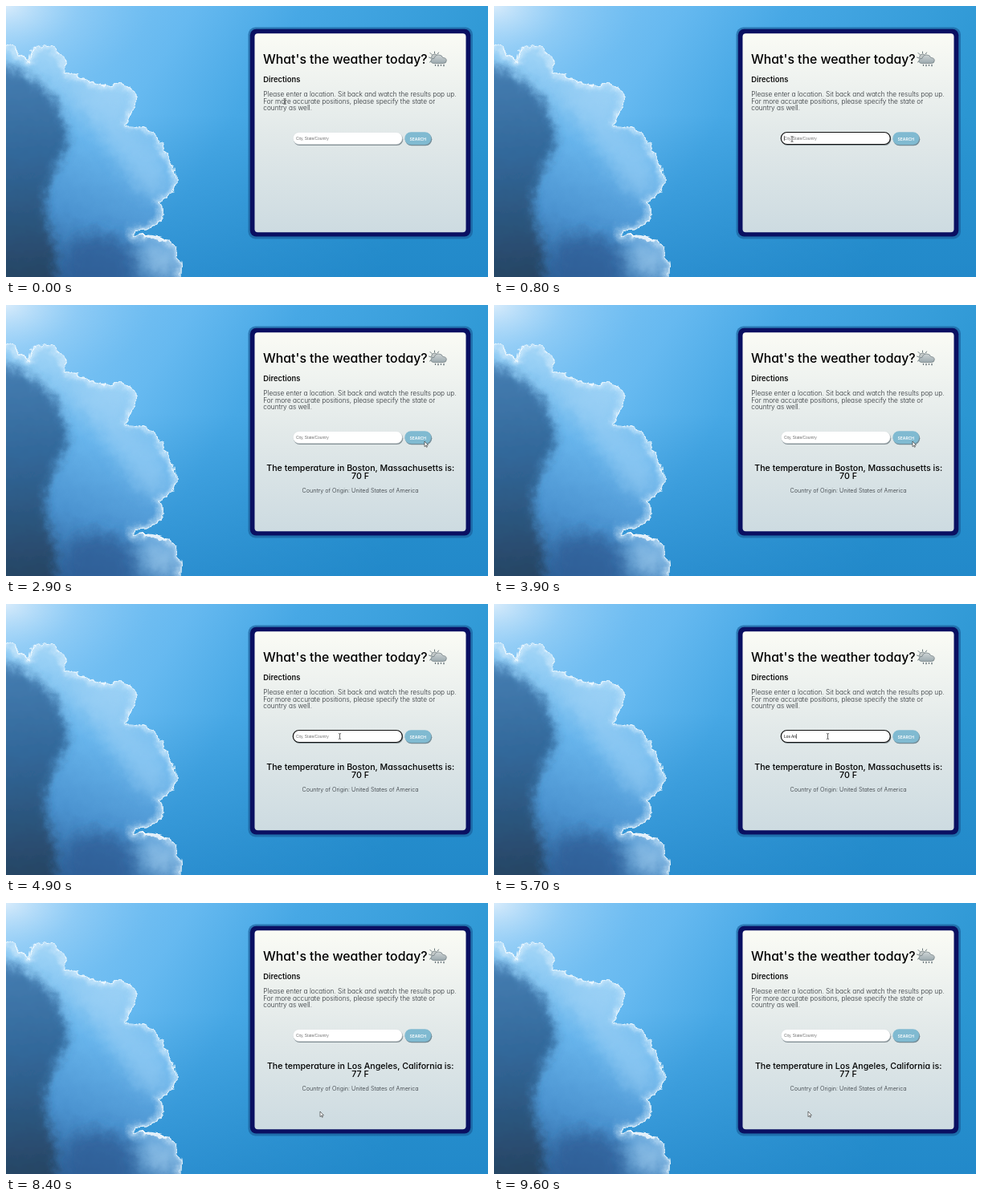
An HTML page for the animation above (9.7 s loop, 600 px wide and 338 px high).

```html
<!DOCTYPE html>
<html lang="en">
<head>
<meta charset="utf-8">
<title>Weather search</title>
<style>
  html, body { margin: 0; width: 100%; height: 100%; overflow: hidden; background: #3d9fde; }
  svg { position: absolute; left: 0; top: 0; width: 600px; height: 338px; }
  text { font-family: Inter, sans-serif; font-feature-settings: "cv11"; fill: #111; }
  .title { font-size: 15.8px; font-weight: 450; fill: #000; }
  .sub { font-size: 9.4px; font-weight: 560; }
  .body { font-size: 8.25px; font-weight: 300; fill: #2c3136; }
  .result { font-size: 10.65px; font-weight: 520; text-anchor: middle; fill: #000; }
  .origin { font-size: 7.2px; font-weight: 300; text-anchor: middle; fill: #2c3136; }
  .field { font-family: "Liberation Sans", Arial, sans-serif; font-size: 4.9px; }
  .button { font-size: 5px; font-weight: 600; text-anchor: middle; fill: #fff; }
</style>
</head>
<body>
<svg viewBox="0 0 600 338">
  <defs>
    <linearGradient id="sky" x1="0" y1="0" x2="1" y2=".35">
      <stop offset="0" stop-color="#8ccaf6"/>
      <stop offset=".35" stop-color="#66b9f0"/>
      <stop offset=".55" stop-color="#47a8e5"/>
      <stop offset="1" stop-color="#2b96d2"/>
    </linearGradient>
    <linearGradient id="low" x1="0" y1="0" x2="0" y2="1">
      <stop offset=".4" stop-color="#1c80c4" stop-opacity="0"/>
      <stop offset="1" stop-color="#1c80c4" stop-opacity=".6"/>
    </linearGradient>
    <radialGradient id="glow">
      <stop offset="0" stop-color="#e4f1fc" stop-opacity=".85"/>
      <stop offset=".5" stop-color="#b4dcf9" stop-opacity=".3"/>
      <stop offset="1" stop-color="#8ccaf6" stop-opacity="0"/>
    </radialGradient>
    <linearGradient id="mass" gradientUnits="userSpaceOnUse" x1="30" y1="338" x2="120" y2="90">
      <stop offset="0" stop-color="#2d5f96"/>
      <stop offset=".35" stop-color="#4b93d0"/>
      <stop offset=".7" stop-color="#68b5ec"/>
      <stop offset="1" stop-color="#9cd2f6"/>
    </linearGradient>
    <linearGradient id="shade" gradientUnits="userSpaceOnUse" x1="0" y1="70" x2="15" y2="338">
      <stop offset="0" stop-color="#477fb3"/>
      <stop offset=".45" stop-color="#316799"/>
      <stop offset="1" stop-color="#274564"/>
    </linearGradient>
    <filter id="rough" x="-10%" y="-10%" width="120%" height="120%" color-interpolation-filters="sRGB">
      <feTurbulence type="fractalNoise" baseFrequency=".085" numOctaves="3" seed="4"/>
      <feDisplacementMap in="SourceGraphic" scale="11" xChannelSelector="R" yChannelSelector="G"/>
    </filter>
    <filter id="soft3" x="-30%" y="-30%" width="160%" height="160%"><feGaussianBlur stdDeviation="3"/></filter>
    <filter id="soft6" x="-30%" y="-30%" width="160%" height="160%"><feGaussianBlur stdDeviation="6"/></filter>
    <filter id="soft10" x="-50%" y="-50%" width="200%" height="200%"><feGaussianBlur stdDeviation="10"/></filter>
    <path id="outline" d="M-20 50Q2 46 12 56T29 68Q29 55 42 50Q56 45 63 56Q74 64 76 84Q90 84 102 93Q118 100 130 97Q149 93 158 105Q165 119 157 132Q153 143 146 148Q161 146 176 153Q193 162 195 181Q209 189 211 206Q214 228 206 237L192 243Q198 254 192 268Q183 282 159 280L160 287Q184 280 202 292Q217 304 218 322L217 360H-20Z"/>
    <clipPath id="cloudClip"><use href="#outline"/></clipPath>
  </defs>
  <rect width="600" height="338" fill="url(#sky)"/>
  <rect width="600" height="338" fill="url(#low)"/>
  <ellipse rx="180" ry="110" fill="url(#glow)"/>
  <g filter="url(#rough)">
    <g clip-path="url(#cloudClip)">
      <use href="#outline" fill="url(#mass)"/>
      <g filter="url(#soft10)">
        <path d="M80 100L150 105L150 150L195 185L205 235L170 235L110 150Z" fill="#a6d6f7" opacity=".5"/>
        <path d="M75 300Q125 265 160 310V360H70Z" fill="#2b5d93" opacity=".75"/>
        <path d="M165 290L215 300V338H180Z" fill="#a3cff0" opacity=".7"/>
      </g>
      <path d="M-30 70Q18 74 38 96Q64 112 70 140Q83 165 73 182Q58 202 50 236Q46 262 58 292Q66 320 60 370H-30Z" fill="url(#shade)" filter="url(#soft6)"/>
      <use href="#outline" fill="none" stroke="#d6edfd" stroke-width="10" opacity=".7" filter="url(#soft3)"/>
      <use href="#outline" fill="none" stroke="#f6fcff" stroke-width="2.5" opacity=".75"/>
      <path d="M159 282L200 292" stroke="#fff" stroke-width="5" opacity=".7"/>
    </g>
  </g>
</svg>

<svg viewBox="0 0 600 338">
  <defs>
    <linearGradient id="card" x1="0" y1="0" x2="0" y2="1">
      <stop offset="0" stop-color="#fafbf5"/>
      <stop offset=".5" stop-color="#e2e9e9"/>
      <stop offset="1" stop-color="#cddbe1"/>
    </linearGradient>
    <linearGradient id="grey" x1="0" y1="0" x2="0" y2="1">
      <stop offset="0" stop-color="#cfd5d6"/>
      <stop offset="1" stop-color="#9ba9ae"/>
    </linearGradient>
    <filter id="blur"><feGaussianBlur stdDeviation=".6"/></filter>
  </defs>
  <rect x="301.5" y="26.5" width="279.500" height="264" rx="9" fill="#1a5c98" opacity=".65" filter="url(#blur)"/>
  <rect x="303.800" y="28.800" width="274.500" height="258.700" rx="7.500" fill="#0a1062"/>
  <rect x="309.500" y="34.300" width="263" height="248" rx="4" fill="url(#card)"/>

  <text class="title" x="320" y="72">What's the weather today?</text>
  <g stroke="#5d6a70" stroke-width=".6" stroke-linecap="round">
    <path d="M526.500 64L529 65M528 58.500L530 60.500M533.500 57V59M538.500 58L537.300 60M527.500 70L529.500 68.500" fill="none" stroke-width=".9"/>
    <circle cx="533.500" cy="64" r="4" fill="#c4cac9"/>
    <path d="M532 71.500Q528.500 71 529 68Q529.500 65 533 65.300Q534.500 60.500 539 61Q543 61.300 543.800 64.500Q548.300 64.500 548.300 68.200Q548 71.500 545 71.500Z" fill="url(#grey)"/>
    <path d="M534.500 73.300V74.300M538 73.300V74.800M541.500 73.300V74.300M545 73.300V74.800" fill="none" stroke-width="1.300"/>
  </g>
  <text class="sub" x="320.300" y="95.300">Directions</text>
  <text class="body">
    <tspan x="320.300" y="113.200">Please enter a location. Sit back and watch the results pop up.</tspan>
    <tspan x="320.300" y="121.500">For more accurate positions, please specify the state or</tspan>
    <tspan x="320.300" y="129.900">country as well.</tspan>
  </text>

  <rect x="357.800" y="158.700" width="136.500" height="15.300" rx="7.600" fill="#6f7c82" opacity=".8" filter="url(#blur)"/>
  <rect id="box" x="357.300" y="157.500" width="136" height="15" rx="7.500" fill="#fff"/>
  <text class="field" id="field" x="361" y="166.700"></text>
  <path id="caret" d="M0 162V168" stroke="#000" stroke-width=".6"/>

  <rect x="496.800" y="158.300" width="33.500" height="16" rx="8" fill="#567482" opacity=".8" filter="url(#blur)"/>
  <rect x="496.300" y="157.300" width="33" height="15.700" rx="7.800" fill="#80bad1"/>
  <text class="button" x="512.800" y="167.500">SEARCH</text>

  <g id="results">
    <text class="result" id="place" x="441.200" y="206.700"></text>
    <text class="result" id="degrees" x="441" y="217.400"></text>
    <text class="origin" x="441" y="233.500">Country of Origin: United States of America</text>
  </g>

  <g id="cursor">
    <path id="beam" d="M-1.500 -3.500Q0 -3.500 0 -2.500Q0 -3.500 1.500 -3.500M0 -2.500V2.500M-1.500 3.500Q0 3.500 0 2.500Q0 3.500 1.500 3.500" fill="none" stroke="#222" stroke-width=".7"/>
    <path id="arrow" d="M0 -3V3.600L1.500 2.300L2.500 4.400L3.400 4L2.400 1.900L4.400 1.700Z" fill="#fff" stroke="#222" stroke-width=".6"/>
    <path id="hand" d="M-.8 -3Q0 -4 .6 -3V-.8L3 -.2Q3.700 .1 3.500 1L2.900 4H-.5L-2.500 1Q-2.300 .1 -.8 1Z" fill="#fff" stroke="#222" stroke-width=".6"/>
  </g>
</svg>

<script>
const LOOP = 9700, STEP = 100;
const $ = id => document.getElementById(id);
const show = (el, on) => el.setAttribute("visibility", on ? "visible" : "hidden");

// [time, x, y]
const path = [
  [0, 347, 119], [200, 347, 119], [700, 371, 166], [1800, 371, 166],
  [2300, 517, 167], [2600, 517, 167], [2800, 521, 173], [4100, 521, 173],
  [4600, 415.5, 165], [6300, 415.5, 165], [6700, 518, 165], [7400, 518, 165],
  [8300, 391, 263], [LOOP, 391, 263]
];
const searches = [
  { focus: 800, type: 1000, rate: 110, submit: 2400, done: 2700,
    text: "Boston", place: "Boston, Massachusetts", degrees: 70 },
  { focus: 4700, type: 5100, rate: 100, submit: 6800, done: 7000,
    text: "Los Angeles", place: "Los Angeles, California", degrees: 77 }
];

function pointer(t) {
  const i = path.findIndex(p => p[0] > t);
  const [t0, x0, y0] = path[i - 1], [t1, x1, y1] = path[i];
  const k = (t - t0) / (t1 - t0), e = k * k * (3 - 2 * k);
  return [x0 + (x1 - x0) * e, y0 + (y1 - y0) * e];
}

const inside = (x, y, l, t, r, b) => x > l && x < r && y > t && y < b;

function drawCursor(t) {
  const [x, y] = pointer(t);
  const onButton = inside(x, y, 496, 157, 530, 172);
  const onText = inside(x, y, 357, 157, 494, 173) ||
    inside(x, y, 320, 105, 560, 132) || inside(x, y, 325, 198, 557, 236);
  $("cursor").setAttribute("transform", `translate(${x} ${y})`);
  show($("hand"), onButton);
  show($("beam"), onText);
  show($("arrow"), !onButton && !onText);
}

function drawField(t) {
  const s = searches.find(s => t >= s.focus && t < s.submit);
  const count = s ? Math.max(0, Math.floor((t - s.type) / s.rate)) : 0;
  const typed = s ? s.text.slice(0, count) : "";
  const field = $("field"), box = $("box");
  field.textContent = typed || "City, State/Country";
  field.style.fill = typed ? "#111" : "#707070";
  box.setAttribute("stroke", s ? "#111" : "#d5dadd");
  box.setAttribute("stroke-width", s ? 1.2 : .5);
  const typing = typed && count <= s.text.length + 4;
  show($("caret"), s && (typing || (t - s.focus) % 1000 < 200));
  const end = 361.4 + (typed ? field.getComputedTextLength() : 0);
  $("caret").setAttribute("transform", `translate(${end} 0)`);
}

function drawResults(t) {
  const last = searches.filter(s => t >= s.done).pop();
  show($("results"), last);
  if (!last) return;
  $("place").textContent = `The temperature in ${last.place} is:`;
  $("degrees").textContent = `${last.degrees} F`;
}

function frame() {
  const t = Math.floor((performance.now() % LOOP) / STEP) * STEP;
  drawCursor(t);
  drawField(t);
  drawResults(t);
  requestAnimationFrame(frame);
}
frame();
</script>
</body>
</html>
```
